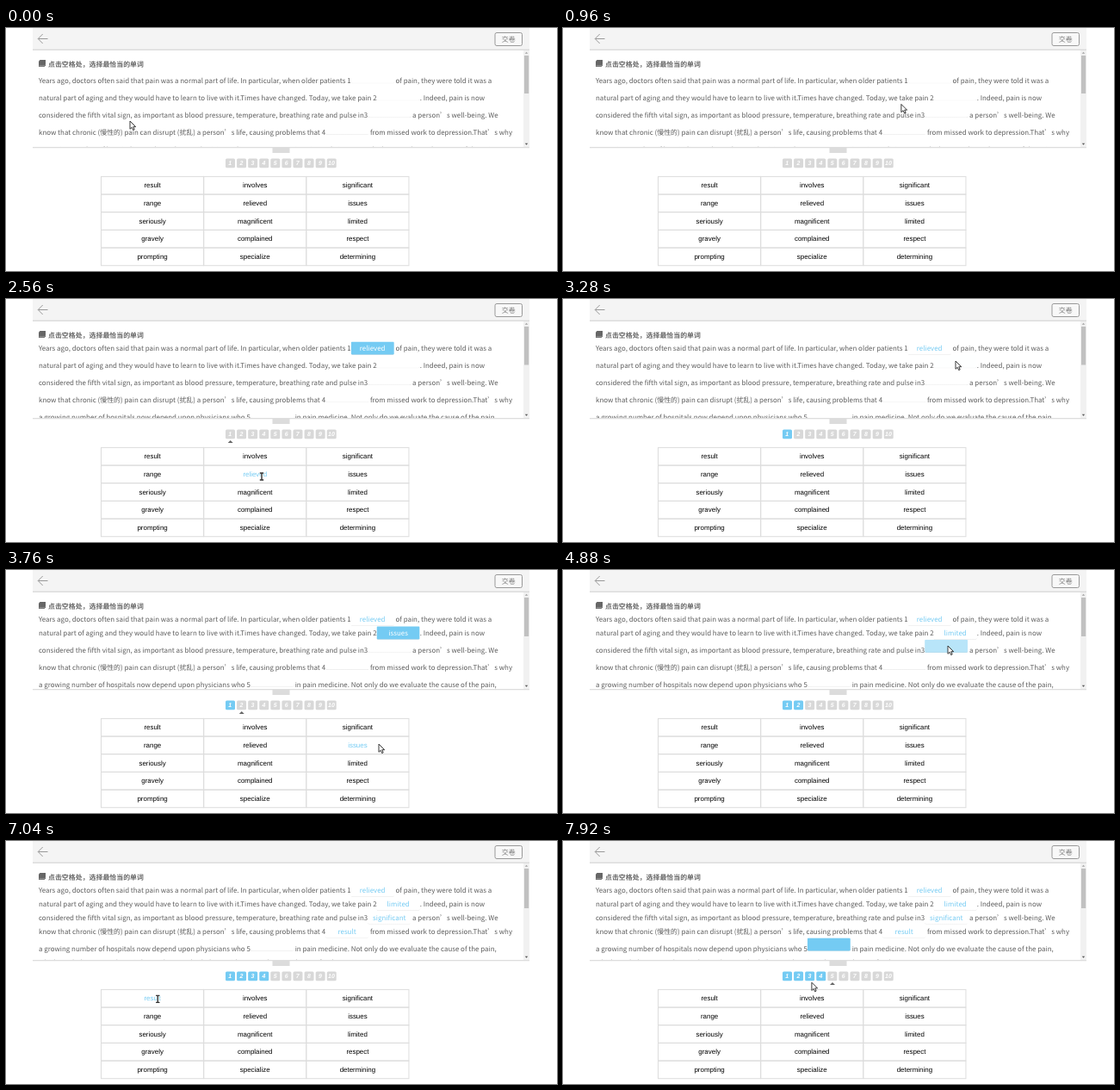
An HTML page for the animation above (8 s loop, 640 by 282 pixels).

```html
<!DOCTYPE html>
<html lang="zh-CN">
<head>
<meta charset="utf-8">
<style>
html, body { margin: 0; width: 100%; height: 100%; overflow: hidden; background: #fff; }
body { text-rendering: geometricPrecision; }
svg { position: absolute; left: 0; top: 0; width: 640px; height: 282px; }
text, #passage { font-family: "Noto Sans CJK SC", "Noto Sans CJK", sans-serif; }
text { font-size: 7.93px; text-anchor: middle; }
.cell { font-family: "Liberation Sans", Arial, sans-serif; }
.num { font: italic bold 7px "Liberation Sans", Arial, sans-serif; fill: #fff; }
#pane { position: absolute; left: 31px; top: 26px; width: 570px; height: 112.5px; overflow: hidden; }
#passage { position: absolute; left: 7px; top: 23.4px; margin: 0; white-space: pre; color: #5c5c5c;
  font-size: 16px; line-height: 32px; transform: scale(.4956); transform-origin: 0 0; }
.gap { display: inline-block; width: 101px; height: 30px; line-height: 30px; text-align: center;
  border-bottom: 1px dotted #aaa; border-radius: 3px; }
</style>
</head>
<body>
<div id="pane"><p id="passage"></p></div>
<svg viewBox="0 0 640 282">
  <rect x="31" width="577" height="25" fill="#f4f4f4"/>
  <rect x="31" y="24.7" width="577" height="1" fill="#ccc"/>
  <path d="M48.5 12.5H37.5M42.7 7L37.2 12.5L42.7 18" fill="none" stroke="#999"/>
  <rect x="568" y="5.5" width="31.5" height="15" rx="2" fill="#f8f8f8" stroke="#999"/>
  <text x="583.8" y="15.8" fill="#777">交卷</text>
  <path d="M39.5 37H46V43.5L44.5 45H38V38.5Z" fill="#666"/>
  <path d="M38.5 43.8H44.3L45.6 42.5" fill="none" stroke="#bbb" stroke-width=".6"/>
  <text x="49" y="44.6" fill="#666" font-weight="bold" style="text-anchor:start">点击空格处，选择最恰当的单词</text>
  <rect x="601" y="26" width="7" height="112" fill="#f1f1f1"/>
  <rect id="thumb" x="602" y="32" width="5.2" fill="#c1c1c1"/>
  <path d="M602.8 29.8L604.5 27.8L606.2 29.8Z" fill="#a3a3a3"/>
  <path d="M602.8 133.8L604.5 135.8L606.2 133.8Z" fill="#505050"/>
  <rect x="31" y="138" width="577" height="1.3" fill="#ddd"/>
  <rect x="309.5" y="139" width="20" height="6" fill="#dcdcdc"/>
  <g id="numbers"></g>
  <path id="mark" d="M-3 167L0 164L3 167Z" fill="#666"/>
  <g id="cells"></g>
  <path id="arrow" d="M0 0V9.3L2.2 7.3L3.7 10.6L5.2 9.9L3.8 6.7H6.7Z" fill="#fff" stroke="#222" stroke-width=".9"/>
  <g id="beam" fill="none">
    <path d="M-2.5 -4.3H2.5M0 -4.3V4.3M-2.5 4.3H2.5" stroke="#fff" stroke-width="2.6"/>
    <path d="M-2.2 -4H2.2M0 -4V4M-2.2 4H2.2" stroke="#333" stroke-width="1.4"/>
  </g>
</svg>
<script>
const BLUE = '#74cbf3', LOOP = 8000, PAUSE = 300;
const $ = id => document.getElementById(id);
const clamp = v => Math.max(0, Math.min(1, v));

// Each underscore is a gap to fill in.
const passage = `Years ago, doctors often said that pain was a normal part of life. In particular, when older patients 1_ of pain, they were told it was a
natural part of aging and they would have to learn to live with it.Times have changed. Today, we take pain 2_. Indeed, pain is now
considered the fifth vital sign, as important as blood pressure, temperature, breathing rate and pulse in3_ a person’s well-being. We
know that chronic (慢性的) pain can disrupt (扰乱) a person’s life, causing problems that 4_ from missed work to depression.That’s why
a growing number of hospitals now depend upon physicians who 5_ in pain medicine. Not only do we evaluate the cause of the pain,
which can help us treat the pain better, but we also help provide comprehensive therapy for depression`;

const words = ['result', 'involves', 'significant', 'range', 'relieved', 'issues', 'seriously', 'magnificent',
  'limited', 'gravely', 'complained', 'respect', 'prompting', 'specialize', 'determining'];

// Pointer stops: time, x, y, and what is clicked there (a gap's index or a word)
const stops = [
  [0, 144, 108], [240, 144, 108], [520, 240, 184],
  [1120, 448, 54, 0], [1920, 371, 168], [2400, 297, 206, 'relieved'],
  [3280, 456, 72, 1], [3720, 433, 202, 'issues'], [4000, 430, 226, 'limited'],
  [4800, 447, 88, 2], [5280, 411, 179, 'significant'], [5760, 396, 163],
  [6080, 395, 96, 3], [6720, 170, 186.5, 'result'],
  [7480, 308, 118, 4], [7920, 289, 164], [LOOP, 281, 178]
];

function add(parent, tag, attrs, text = '') {
  const el = document.createElementNS('http://www.w3.org/2000/svg', tag);
  for (const k in attrs) el.setAttribute(k, attrs[k]);
  el.textContent = text;
  $(parent).appendChild(el);
  return el;
}

$('passage').innerHTML = passage.replace(/_/g, '<span class="gap"></span>');
const gaps = [...document.querySelectorAll('.gap')].map(el => ({ el, picks: [], done: Infinity }));
let current;
for (const [time, , , target] of stops) {
  if (typeof target === 'number') {
    current = gaps[target];
    current.open = time;
  } else if (target) {
    current.picks.push({ time, word: target });
    current.done = time + PAUSE;
  }
}

const boxes = Array.from({ length: 10 }, (_, i) => {
  const x = 255 + 13.08 * i;
  const box = add('numbers', 'rect', { x, y: 151.5, width: 11, height: 10.7, rx: 1.5 });
  add('numbers', 'text', { class: 'num', x: x + 5.3, y: 159.4 }, i + 1);
  return box;
});
const cells = words.map((word, i) => {
  const x = 110.5 + 119.15 * (i % 3), y = 172.4 + 20.66 * Math.floor(i / 3);
  add('cells', 'rect', { x, y, width: 119.15, height: 20.66, fill: 'none', stroke: '#ddd' });
  return { word, x: x + 59.6, y: y + 10, el: add('cells', 'text', { class: 'cell', x: x + 59.6, y: y + 12.8 }, word) };
});

function pointer(t) {
  const i = stops.findIndex(s => s[0] > t);
  const [t0, x0, y0, target] = stops[i - 1], [t1, x1, y1] = stops[i];
  const rest = target === undefined ? 0 : Math.min(PAUSE, (t1 - t0) / 2);
  const k = clamp((t - t0 - rest) / (t1 - t0 - rest));
  return [x0 + (x1 - x0) * k, y0 + (y1 - y0) * k];
}

function draw(t) {
  let filled = 0, active = -1, chosen = '';
  gaps.forEach((g, i) => {
    const pick = g.picks.filter(p => p.time <= t).pop();
    const done = t >= g.done;
    g.el.textContent = pick ? pick.word : '';
    g.el.style.color = done ? BLUE : '#fff';
    g.el.style.background = `rgba(116, 203, 243, ${done ? 0 : clamp((t - g.open) / 160)})`;
    boxes[i].style.fill = done ? BLUE : '';
    if (pick) filled++;
    if (pick && t < g.done + 120) chosen = pick.word;
    if (t >= g.open + 320 && !done) active = i;
  });
  $('thumb').setAttribute('height', 44 + .5 * filled);
  $('mark').setAttribute('transform', `translate(${260.7 + 13.08 * active})`);
  $('mark').style.display = active < 0 ? 'none' : '';
  cells.forEach(c => c.el.style.fill = c.word === chosen ? BLUE : '#000');

  const [x, y] = pointer(t);
  const overText = cells.some(c => Math.abs(x - c.x) < 14 && Math.abs(y - c.y) < 5);
  for (const [id, on] of [['arrow', !overText], ['beam', overText]]) {
    $(id).style.display = on ? '' : 'none';
    $(id).setAttribute('transform', `translate(${x} ${y})`);
  }
}

function frame() {
  draw(performance.now() % LOOP);
  requestAnimationFrame(frame);
}
$('numbers').setAttribute('fill', '#d8d8d8');
frame();
</script>
</body>
</html>
```
